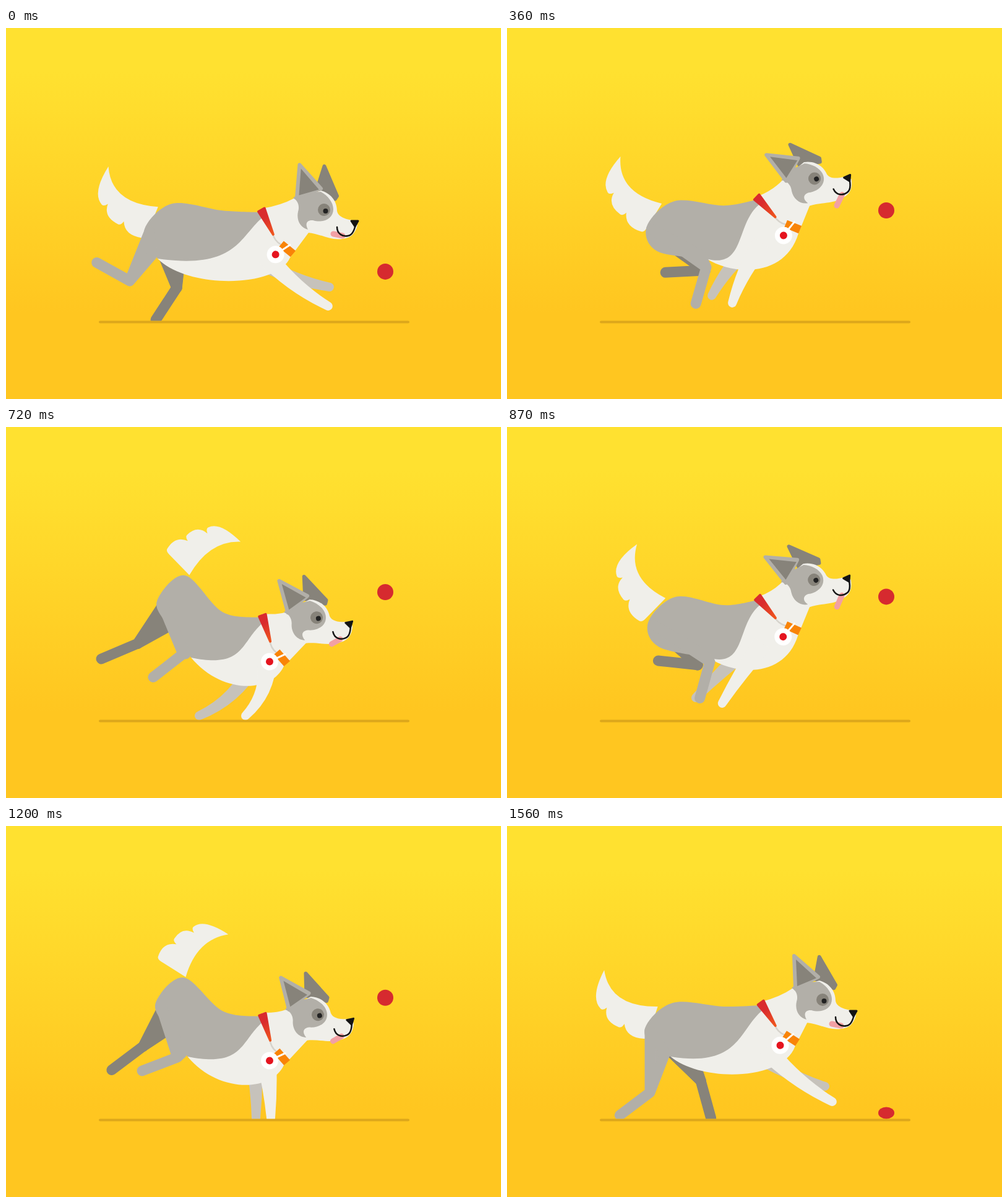
These frames come from a looping animation (800x600 px, 1590 ms). An HTML page:

```html
<!DOCTYPE html>
<html lang="en">
<head>
<meta charset="utf-8">
<title>Running dog</title>
<style>
html, body { margin: 0; width: 100%; height: 100%; overflow: hidden; background: #ffc620; }
svg { display: block; width: 100vw; height: 100vh; }
.limb { stroke-width: 17; stroke-linejoin: round; stroke-linecap: round; }
.gray { fill: #b2afa8; stroke: #b2afa8; }
.dark { fill: #87837a; stroke: #87837a; }
.white { fill: #f0efea; }
.ear { stroke-width: 6; stroke-linejoin: round; }
.line { fill: none; stroke-linecap: round; }
</style>
</head>
<body>
<svg viewBox="0 0 800 600">
  <defs>
    <linearGradient id="sky" gradientUnits="userSpaceOnUse" x1="0" y1="70" x2="0" y2="460">
      <stop offset="0" stop-color="#ffe130"/>
      <stop offset="1" stop-color="#ffc620"/>
    </linearGradient>
    <linearGradient id="band">
      <stop offset="0.3" stop-color="#d92b2e"/>
      <stop offset="1" stop-color="#f0571d"/>
    </linearGradient>
    <clipPath id="above"><rect width="800" height="473.5"/></clipPath>
  </defs>
  <rect width="800" height="600" fill="url(#sky)"/>
  <path class="line" d="M152 475.5H650" stroke="#dda71b" stroke-width="4"/>
  <ellipse id="ball" cx="613" rx="13" fill="#d62a2f"/>
  <g clip-path="url(#above)">
    <path id="tail" class="white"/>
    <path id="farThigh" class="dark"/>
    <path id="farShank" class="limb dark"/>
    <path id="farFront" fill="#c6c2bb"/>
    <g class="head">
      <path id="farEar" class="ear dark" d="M508 211L531 258L528 263L499 246Z"/>
    </g>
    <path id="trunk" class="white"/>
    <path id="coat" fill="#b2afa8"/>
    <path id="nearHind" class="limb gray"/>
    <path id="nearFront" class="white"/>
    <g class="head">
      <path class="white" d="M461 262L505 250C520 254 531 266 531 283C533 293 545 296 556 298L564 306C560 320 553 327 540 328C520 331 505 320 484 318L466 306Z"/>
      <path fill="#b2afa8" d="M460 262C470 267 470 278 468 284C465 298 472 310 484 313C478 302 484 297 492 298C508 303 525 296 525 280C525 269 516 258 505 252L470 253Z"/>
      <g id="nearEar">
        <path class="ear gray" d="M464 210L503 244L466 263Z"/>
        <path fill="#87837a" d="M467 216L500 246L469 259Z"/>
      </g>
      <circle cx="510" cy="281" r="10" fill="#87837a"/>
      <circle cx="512.500" cy="283" r="4" fill="#222"/>
      <path id="tongue" class="line" stroke="#f2a0a4" stroke-width="9"/>
      <path class="line" d="M531 309C531 320 540 325 549 323C556 322 559 314 561 305" stroke="#141414" stroke-width="2.500"/>
      <path d="M554 299H565L560 308Z" fill="#141414" stroke="#141414" stroke-width="3" stroke-linejoin="round"/>
    </g>
    <g id="collar">
      <path class="line" d="M40 2Q52 6 62 1" stroke="#d6d3cc" stroke-width="2.500"/>
      <path d="M-2 1L-1 -10L42 2Z" fill="url(#band)" stroke="url(#band)" stroke-width="4" stroke-linejoin="round"/>
      <path d="M62 0L86 -7" stroke="#f98408" stroke-width="13"/>
      <path class="line" d="M71 17L71 -11" stroke="#fff" stroke-width="3"/>
      <circle cx="71" cy="17" r="14" fill="#fff"/>
      <circle cx="71" cy="17" r="6" fill="#e5141f"/>
    </g>
  </g>
</svg>
<script>
const LOOP = 1590, STRIDE = 540, STEP = 30, RUMP = 45;

// Key phases of one stride, and the value of each joint at them.
const KEYS = [0, 60, 90, 180, 240, 420], n = KEYS.length;
const joints = {
  chest: [290, 298, 302, 308, 308, 278],
  lift: [0, 2, 7, 41, 46, 6],
  eyeX: [511, 515, 513, 505, 503, 498],
  eyeY: [281, 294, 299, 305, 308, 243],
  turn: [0, 0, -3, -12, -12, -24],
  ear: [0, 7, 9, 0, -1, -11],
  nearKneeX: [231, 200, 215, 277, 286, 322],
  nearKneeY: [431, 409, 411, 374, 367, 387],
  nearShank: [143, 209, 215, 159, 142, 106],
  farKneeX: [313, 276, 264, 222, 213, 320],
  farKneeY: [412, 420, 413, 356, 350, 392],
  farShank: [75, 122, 135, 143, 157, 177],
  nearPawX: [526, 521, 513, 428, 387, 364],
  nearPawY: [446, 450, 458, 472, 467, 445],
  farPawX: [514, 523, 519, 404, 312, 331],
  farPawY: [421, 419, 427, 472, 467, 433],
  bend: [12, 12, 12, -3, -22, 8]
};

const $ = id => document.getElementById(id);
const draw = (id, d) => $(id).setAttribute('d', d);
const heads = document.querySelectorAll('.head');

const add = (p, x, y) => [p[0] + x, p[1] + y];
const mix = (a, b, t) => [a[0] + (b[0] - a[0]) * t, a[1] + (b[1] - a[1]) * t];
const polar = (p, r, deg) => add(p, r * Math.cos(deg * Math.PI / 180), r * Math.sin(deg * Math.PI / 180));
const at = p => p[0].toFixed(2) + ' ' + p[1].toFixed(2);
const poly = (...ps) => 'M' + ps.map(at).join('L');
const cubic = (...ps) => 'C' + ps.map(at).join(' ');
const quad = (...ps) => 'Q' + ps.map(at).join(' ');

// Smooth periodic blend of key values.
function blend(row, ph) {
  let i = n - 1;
  while (KEYS[i] > ph) i--;
  const gap = k => (KEYS[(k + 1) % n] - KEYS[k % n] + STRIDE) % STRIDE;
  const [a, b, c, d] = [n - 1, 0, 1, 2].map(k => row[(i + k) % n]);
  const h0 = gap(i + n - 1), h1 = gap(i), h2 = gap(i + 1);
  const s0 = (b - a) / h0, s1 = (c - b) / h1, s2 = (d - c) / h2;
  const m0 = (h1 * s0 + h0 * s1) / (h0 + h1);
  const m1 = (h2 * s1 + h1 * s2) / (h1 + h2);
  const u = (ph - KEYS[i]) / h1, v = 1 - u;
  return b * v * v * (1 + 2 * u) + c * u * u * (1 + 2 * v) + h1 * u * v * (m0 * v - m1 * u);
}

function curve(ps) {
  let d = '';
  for (let i = 0; i < ps.length - 1; i++) {
    const a = ps[i - 1] || ps[i], b = ps[i], c = ps[i + 1], e = ps[i + 2] || c;
    d += cubic(add(b, (c[0] - a[0]) / 6, (c[1] - a[1]) / 6),
      add(c, (b[0] - e[0]) / 6, (b[1] - e[1]) / 6), c);
  }
  return d;
}

function side(p, from, to, w) {
  const dx = to[0] - from[0], dy = to[1] - from[1], r = w / Math.hypot(dx, dy);
  return add(p, -dy * r, dx * r);
}

// Bent limb that narrows towards a round end.
function taper(a, c, bend, w0, w1) {
  const b = side(mix(a, c, 0.5), a, c, bend), w = (w0 + w1) / 4, r = w1 / 2;
  const edge = s => [side(a, a, b, s * w0 / 2), side(b, a, c, s * w), side(c, b, c, s * r)];
  const l = edge(-1), k = edge(1);
  return poly(l[0]) + quad(l[1], l[2]) + `A${r} ${r} 0 0 1 ${at(k[2])}` + quad(k[1], k[0]) + 'Z';
}

// The inner edge is one arc turned about the rump; three tufts hang off its outside.
function drawTail(rump, lift) {
  const swing = 1.97 * lift - 138.5;
  const root = polar(rump, 46, 0.89 * lift - 122);
  const mid = polar(rump, 109, swing - 21);
  const tip = polar(rump, 148 - 0.3 * lift, swing);
  const off = (s, w) => {
    const a = mix(root, mid, s), b = mix(mid, tip, s);
    return side(mix(a, b, s), a, b, -w);
  };
  let d = poly(tip);
  for (let k = 0; k < 3; k++) {
    const s = 0.6 - 0.24 * k, w = 34 + 9.5 * k;
    d += quad(off(s + 0.15, w + 3), off(s, w)) + quad(off(s - 0.03, w), off(s - 0.04, w - 8));
  }
  draw('tail', d + 'L' + at(root) + quad(mid, tip));
}

function drawHead(j) {
  for (const g of heads)
    g.setAttribute('transform', `translate(${j.eyeX} ${j.eyeY}) rotate(${j.turn}) translate(-511 -281)`);
  $('nearEar').setAttribute('transform', `rotate(${j.ear} 482 262)`);
  $('farEar').setAttribute('transform', `rotate(${j.ear - 4} 517 258)`);
  draw('tongue', poly([540, 323], [525, 320 - 0.65 * j.turn]));
}

function drawBody(j) {
  const neck = [411 - (308 - j.chest) ** 2 / 100, j.chest];
  const slant = 49 + 0.87 * (j.chest - 290);
  const rump = [268 + 0.46 * j.lift, 331 - j.lift];
  const groin = [0.63 * j.nearKneeX + 119, 373];
  $('collar').setAttribute('transform', `translate(${neck}) rotate(${slant})`);

  const eye = [j.eyeX, j.eyeY], top = add(neck, 4, -6);
  const nape = polar(eye, 52.5, j.turn + 201), jaw = polar(eye, 44, j.turn + 125);
  const throat = polar(neck, 88, slant), low = j.chest + 112;
  draw('trunk', poly(neck, top) + quad(add(mix(top, nape, 0.5), 5, 3), nape) +
    'L' + at(jaw) + 'L' + at(throat) +
    cubic([throat[0] - 20, low + 10], [groin[0] + 50, low + 13], groin) + 'Z');

  const seam = add(neck, 5, 8), back = [350, 176 + 0.4 * j.chest];
  draw('coat', poly(neck) +
    curve([neck, back, add(rump, 0, -RUMP), add(rump, -RUMP, -4), add(rump, -28, 36), groin]) +
    cubic([groin[0] + 0.75 * (seam[0] - groin[0]), groin[1] + 18], add(seam, -38, 32), seam) + 'Z');

  drawTail(rump, j.lift);
  drawLegs(j, neck, rump, groin);
}

function drawLegs(j, neck, rump, groin) {
  const ground = p => [p[0], Math.min(p[1], 472)];
  const knee = [j.nearKneeX, j.nearKneeY], farKnee = [j.farKneeX, j.farKneeY];
  draw('nearHind', poly(add(rump, -37, 0), knee, add(groin, -9, -6)) + 'Z' +
    poly(knee, ground(polar(knee, 61, j.nearShank))));
  draw('farThigh', taper(add(rump, -6, 0), farKnee, 0, 64, 17));
  draw('farShank', poly(farKnee, ground(polar(farKnee, 64, j.farShank))));
  draw('nearFront', taper(add(neck, 10, 70), ground([j.nearPawX, j.nearPawY]), j.bend, 32, 14));
  draw('farFront', taper(add(neck, -10, 75), ground([j.farPawX, j.farPawY]), j.bend, 26, 14));
}

function drawBall(ph) {
  const rise = (u, m) => u >= 1 ? 1 : m * u * (1 - u) * (1 - u) + u * u * (3 - 2 * u);
  const left = STRIDE - ph;
  const lift = Math.min(rise(ph / 220, 1.2), rise(left / 180, 1.58));
  const squash = Math.max(0, 1 - Math.min(ph, left) / 25);
  $('ball').setAttribute('cy', 464 - 197 * lift);
  $('ball').setAttribute('ry', 13 - 3.5 * squash);
}

function render(ms) {
  const t = ms % LOOP;
  let q = Math.floor(t / STEP) * STEP;
  if (q === 30 || q === 1230) q -= STEP; // held drawings
  const ph = (q + 60) % STRIDE, j = {};
  for (const name in joints) j[name] = blend(joints[name], ph);
  drawHead(j);
  drawBody(j);
  drawBall(ph);
}

const start = performance.now();
function tick() {
  render(performance.now() - start);
  requestAnimationFrame(tick);
}
tick();
</script>
</body>
</html>
```
